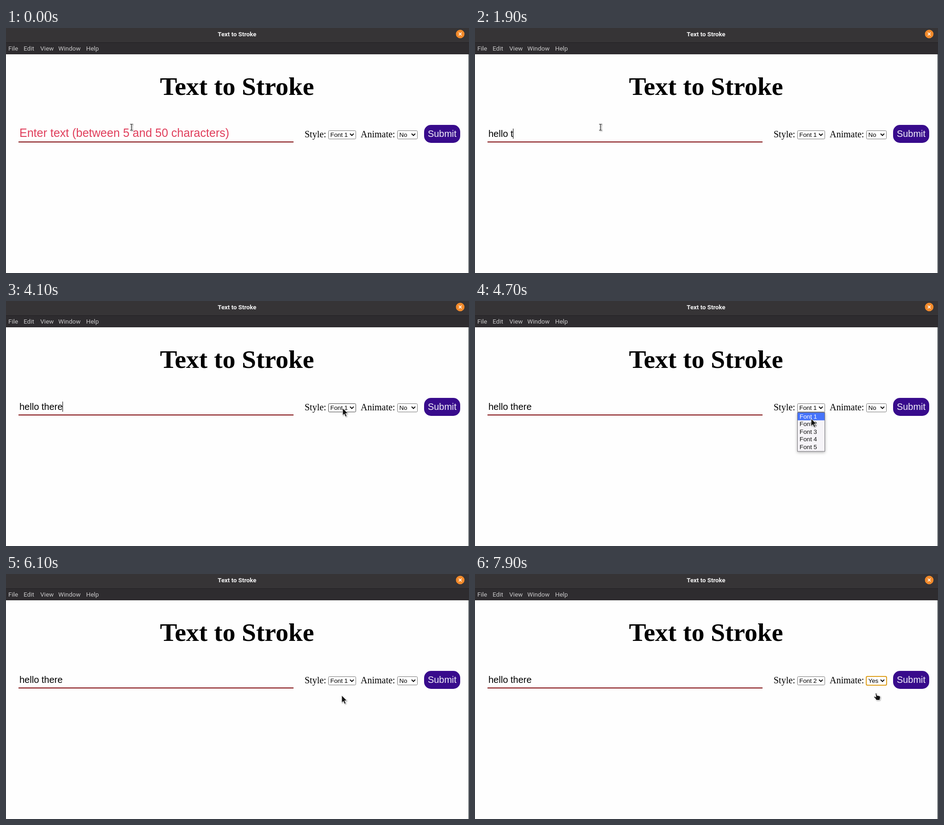
Write an HTML page that moves like this. It is 1000 by 531 pixels and loops after 8000 ms.

```html
<!DOCTYPE html>
<html lang="en">
<head>
<meta charset="utf-8">
<title>Text to Stroke</title>
<style>
html, body { margin: 0; width: 100%; height: 100%; overflow: hidden; background: #fefefe; }
svg { display: block; width: 1000px; height: 531px; }
text { white-space: pre; }
.bar { font: 13.5px Roboto, "Open Sans", sans-serif; fill: #c9c8c9; }
.title { font: bold 13.3px Roboto, "Open Sans", sans-serif; fill: #f4f4f4; }
.heading { font: bold 55.5px "Liberation Serif", serif; }
.label { font: 20px "Liberation Serif", serif; }
.input, .button { font: 20px "Liberation Sans", sans-serif; }
.hint { font: 25px "Liberation Sans", sans-serif; fill: #e03e5b; }
.option { font: 13.333px "Liberation Sans", sans-serif; }
.popup { filter: drop-shadow(0 2px 3px rgba(0, 0, 0, .3)); }
#pointer { filter: drop-shadow(1px 1px 1px rgba(0, 0, 0, .35)); }
</style>
</head>
<body>
<svg viewBox="0 0 1000 531">
  <rect width="1000" height="531" fill="#fefefe"/>
  <rect width="1000" height="57" fill="#2e2c2f"/>
  <rect width="1000" height="31" fill="#363436"/>
  <rect y="31" width="1000" height="1" fill="#222023"/>
  <rect x="999" y="57" width="1" height="474" fill="#262e34"/>
  <text class="title" x="499" y="18" text-anchor="middle">Text to Stroke</text>
  <circle cx="981" cy="13" r="9.3" fill="#f28a2b"/>
  <path d="M978 10l6 6m0-6l-6 6" stroke="#fff" stroke-width="1.7"/>
  <g class="bar">
    <text x="5" y="49">File</text>
    <text x="38" y="49">Edit</text>
    <text x="74" y="49">View</text>
    <text x="113" y="49">Window</text>
    <text x="173" y="49">Help</text>
  </g>
  <text class="heading" x="499" y="145" text-anchor="middle">Text to Stroke</text>

  <text id="hint" class="hint" x="29" y="236">Enter text (between 5 and 50 characters)</text>
  <text id="typed" class="input" x="29" y="236"></text>
  <rect id="caret" width="1" height="22"/>
  <rect x="27" y="246" width="594" height="2" fill="#800a0e"/>

  <text class="label" x="645" y="237">Style:</text>
  <text class="label" x="766" y="237">Animate:</text>
  <rect id="button" x="903" y="210" width="78" height="39" rx="15"/>
  <text id="submit" class="button" x="942" y="236" text-anchor="middle">Submit</text>
  <g id="selects"></g>
  <g id="pointer"></g>
</svg>
<script>
const $ = id => document.getElementById(id);
const ROW = 16.6, LIST_TOP = 242;

const typing = [[0, ""], [500, "h"], [800, "he"], [900, "hell"], [1200, "hello"],
  [1400, "hello "], [1900, "hello t"], [2300, "hello th"], [2400, "hello ther"], [3000, "hello there"]];

// Pointer stops: time, x, y
const path = [[0, 271, 215], [3300, 271, 215], [3500, 335, 192], [3700, 490, 158],
  [3900, 665, 190], [4000, 714, 223], [4100, 727, 232], [4500, 727, 232], [4800, 726, 266],
  [5100, 722, 300], [5400, 722, 300], [5700, 723, 266], [5800, 723, 266], [5900, 725, 263],
  [6200, 725, 263], [6500, 820, 226], [6700, 886, 213], [6900, 867, 223], [7100, 867, 223],
  [7200, 867, 231], [7400, 867, 231], [7500, 867, 246], [7600, 867, 262], [8000, 867, 262]];

const selects = [
  { x: 696, w: 60, options: ["Font 1", "Font 2", "Font 3", "Font 4", "Font 5"],
    open: 4300, close: 6100, change: 6300 },
  { x: 845, w: 44, options: ["No", "Yes"], open: 7400, close: 7700, change: 7900, ring: true }
];

const shapes = {
  beam: `<path d="M-3-6.5h2.5L0-6 .5-6.5H3M0-6V6M-3 6.5h2.5L0 6 .5 6.5H3" fill="none" stroke="#fff" stroke-width="3"/>
    <path d="M-3-6.5h2.5L0-6 .5-6.5H3M0-6V6M-3 6.5h2.5L0 6 .5 6.5H3" fill="none" stroke="#111" stroke-width="1.2"/>`,
  arrow: `<path d="M0 0V16.2L3.7 12.8 6.2 18.8 9.1 17.5 6.5 11.7H11.5Z" fill="#111" stroke="#fff"/>`,
  hand: `<path d="M-2.2-3.2Q-1-5 .3-3.2L1.3 1.2 6.5 2.2Q8.5 2.8 8.4 5L7.8 8.5 7 11.5H-.5L-1.5 9-5.3 4.8Q-5.6 3-3.6 3.4L-1 5Z" fill="#111" stroke="#fff"/>`
};

const inside = (t, from, to) => t >= from && t < to;

function pointerAt(t) {
  const i = Math.max(1, path.findIndex(p => p[0] >= t));
  const [t0, x0, y0] = path[i - 1], [t1, x1, y1] = path[i];
  const k = (t - t0) / (t1 - t0);
  return { x: x0 + (x1 - x0) * k, y: y0 + (y1 - y0) * k };
}

function popup({ x, w, options }, chosen) {
  const h = options.length * ROW + 1.4;
  const rows = options.map((name, i) => {
    const on = i === chosen, y = LIST_TOP + i * ROW;
    return (on ? `<rect x="${x + 1}" y="${y}" width="${w - 2}" height="${ROW}" fill="#4673fb"/>` : "") +
      `<text class="option" x="${x + 5}" y="${y + 12.5}" fill="${on ? "#fff" : "#111"}">${name}</text>`;
  });
  return `<rect class="popup" x="${x + .5}" y="241.5" width="${w - 1}" height="${h}" fill="#f6f4f8" stroke="#77747a"/>` + rows.join("");
}

function drawSelect(s, t, p) {
  const { x, w, options } = s;
  const open = inside(t, s.open, s.close), changed = t >= s.change;
  const hover = !open && inside(p.x, x, x + w) && inside(p.y, 222, 241);
  const row = Math.floor((p.y - LIST_TOP) / ROW);
  const chosen = Math.max(0, Math.min(options.length - 1, row));
  const ring = s.ring && changed;
  return `<rect x="${x + .5}" y="222.5" width="${w - 1}" height="18" rx="2" fill="#fff" stroke="${hover ? "#444" : "#767676"}"/>` +
    (ring ? `<rect x="${x}" y="222" width="${w}" height="19" rx="2.5" fill="none" stroke="#dfa01d" stroke-width="2"/>` : "") +
    `<text class="option" x="${x + 4.5}" y="236">${options[changed ? 1 : 0]}</text>` +
    `<path d="M${x + w - 13} 229l4 4 4-4" fill="none" stroke="#111" stroke-width="2"/>` +
    (open ? popup(s, chosen) : "");
}

function draw(t) {
  const text = typing.filter(k => k[0] <= t).pop()[1];
  $("typed").textContent = text;
  $("hint").style.display = text ? "none" : "";

  const caret = $("caret");
  const length = text ? $("typed").getComputedTextLength() : 0;
  caret.setAttribute("x", Math.floor(29 + length));
  caret.setAttribute("y", text ? 218 : 219);
  caret.style.display = inside(t, 300, 3200) || inside(t, 3800, 4300) ? "" : "none";

  const disabled = inside(t, 500, 1300);
  $("button").setAttribute("fill", disabled ? "#a794d0" : "#380b8c");
  $("submit").setAttribute("fill", disabled ? "#cfc0eb" : "#f3f0fa");

  const p = pointerAt(t);
  $("selects").innerHTML = selects.map(s => drawSelect(s, t, p)).join("");
  const shape = t >= 7900 ? "hand" : p.x < 621 && p.y > 208 ? "beam" : "arrow";
  $("pointer").innerHTML = shapes[shape];
  $("pointer").setAttribute("transform", `translate(${Math.round(p.x)} ${Math.round(p.y)})`);
}

// The screen updates ten times a second
let last = -1;
function frame(now) {
  const t = Math.floor(now % 8000 / 100) * 100;
  if (t !== last) draw(last = t);
  requestAnimationFrame(frame);
}
draw(0);
const start = performance.now();
requestAnimationFrame(function tick(now) { frame(Math.max(0, now - start)); });
</script>
</body>
</html>
```
